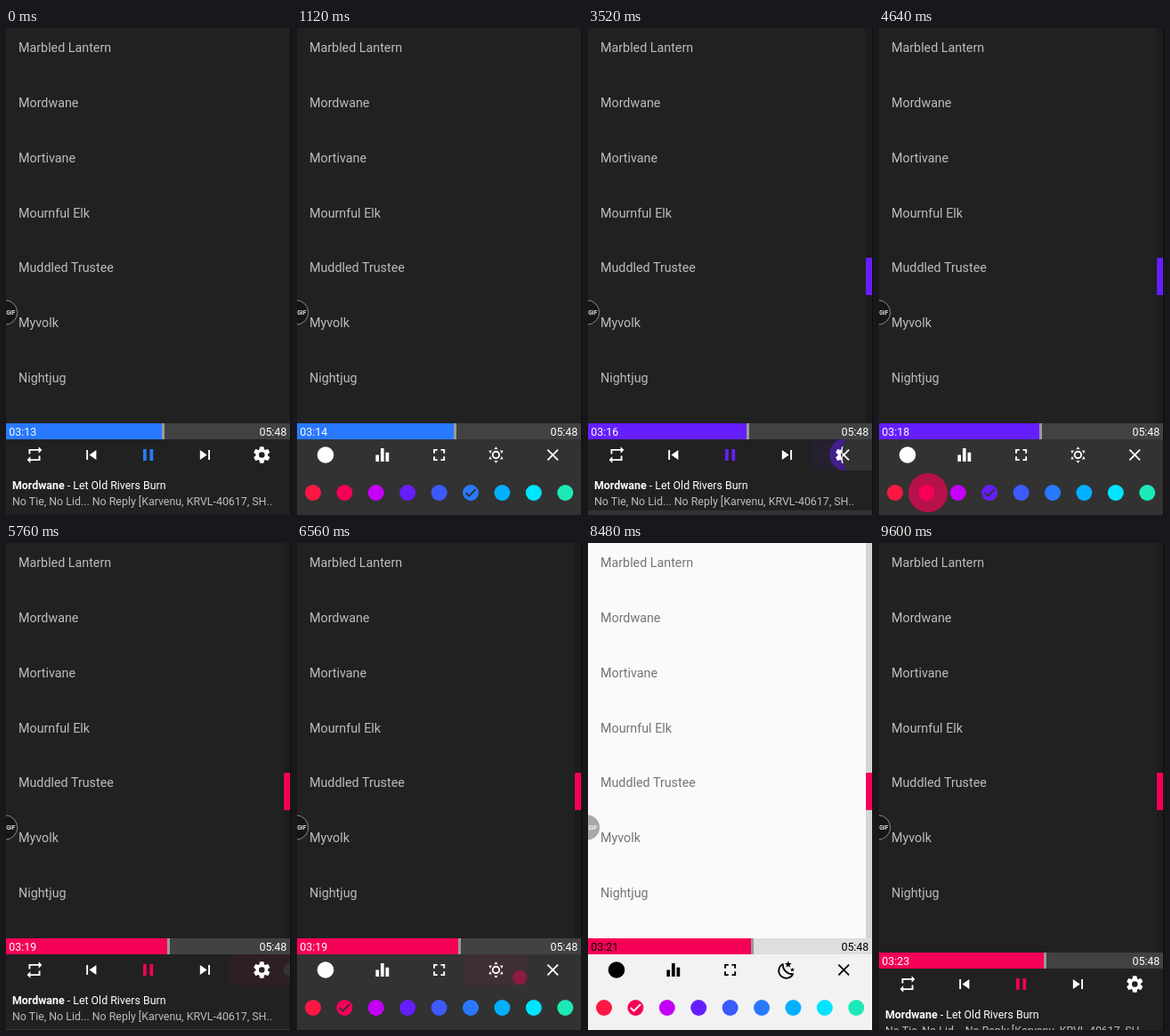
Recreate the animation shown at these times as an HTML page. Size 320x547 px, loop 9.76 s.

```html
<!DOCTYPE html>
<html lang="en">
<head>
<meta charset="utf-8">
<title>Music player themes</title>
<style>
  html, body { margin: 0; width: 100%; height: 100%; overflow: hidden; background: #212121; }
  svg { display: block; width: 100%; height: 100%; }
  text { font-family: Roboto, "Open Sans", sans-serif; font-size: 12.4px; white-space: pre; }
  .row { font-size: 14.3px; }
  .badge { font-size: 6.8px; font-weight: 500; }
</style>
</head>
<body>
<svg id="stage" viewBox="0 0 320 547" preserveAspectRatio="none"></svg>
<script>
const LOOP = 9760, STEP = 160, LENGTH = 348;
const stage = document.getElementById('stage');

const artists = ['Marbled Lantern', 'Mordwane', 'Mortivane', 'Mournful Elk',
  'Muddled Trustee', 'Myvolk', 'Nightjug'];
const swatches = ['#ff1744', '#f50057', '#c400f8', '#651fff', '#3d5afe',
  '#2979ff', '#00b0ff', '#00e5ff', '#1de9b6'];

const dark = { list: '#212121', panel: '#323232', bar: '#424242', row: '#bcbcbc',
  ink: '#fff', sub: '#bcbcbc', tick: '#303030', badge: '#161616', rim: '#8a8a8a' };
const light = { list: '#fafafa', panel: '#f2f2f2', bar: '#dedede', row: '#757575',
  ink: '#000', sub: '#666', tick: '#fff', badge: '#a8a8a8', rim: '#a8a8a8' };

// Each look lasts until the next one; its settings start to open at "open".
const looks = [
  { at: 0, pick: 5, theme: dark, open: 240 },
  { at: 2720, pick: 3, theme: dark, open: 3420, scroll: true },
  { at: 4960, pick: 1, theme: dark, open: 5715, scroll: true },
  { at: 7200, pick: 1, theme: light, open: 7960, scroll: true },
  { at: 9600, pick: 1, theme: dark, open: LOOP, scroll: true }
];

// Touch ripples: from and to are [x, y, radius].
const gear = [287, 479, 30], sun = [223, 479, 30];
const taps = [
  { at: 160, span: 480, from: [287, 479, 8], to: gear, button: true },
  { at: 2080, span: 640, from: [127, 522, 23], to: [124, 522, 25], color: swatches[3] },
  { at: 3520, span: 320, from: [289, 479, 18], to: gear, button: true },
  { at: 4640, span: 320, from: [55, 522, 22], to: [53, 522, 25], color: swatches[1] },
  { at: 5760, span: 320, from: [287, 479, 0], to: gear, button: true },
  { at: 6560, span: 640, from: [250, 488, 8], to: sun, button: true },
  { at: 8000, span: 320, from: [287, 479, 8], to: gear, button: true },
  { at: 8800, span: 640, from: [238, 486, 8], to: sun, button: true }
];

// Moments at which the elapsed seconds go up by one.
const ticks = [640, 1440, 2560, 3680, 4640, 5280, 6880, 8000, 8960, 9600];

const part = (t, a, b) => Math.min(1, Math.max(0, (t - a) / (b - a)));
const easeOut = k => 1 - (1 - k) ** 2;
const smooth = k => k * k * (3 - 2 * k);
const mix = (a, b, k) => a + (b - a) * k;
const clock = s => [s / 60, s % 60].map(n => String(Math.floor(n)).padStart(2, '0')).join(':');

const rect = (x, y, w, h, fill, more = '') =>
  `<rect x="${x}" y="${y}" width="${w}" height="${h}" fill="${fill}" ${more}/>`;
const disc = (x, y, r, fill, more = '') =>
  `<circle cx="${x}" cy="${y}" r="${r}" fill="${fill}" ${more}/>`;
const text = (x, y, fill, str, more = '') =>
  `<text x="${x}" y="${y}" fill="${fill}" ${more}>${str}</text>`;
const path = (d, more = '') => `<path d="${d}" ${more}/>`;
const clip = (id, shape, body) =>
  `<clipPath id="${id}">${shape}</clipPath><g clip-path="url(#${id})">${body}</g>`;
const shift = (y, body) => `<g transform="translate(0 ${y})">${body}</g>`;
const spin = (n, d) => Array.from({ length: n }, (_, i) =>
  path(d, `transform="rotate(${i * 360 / n} 12 12)"`)).join('');
const ring = (r, w) => disc(12, 12, r, 'none', `stroke="currentColor" stroke-width="${w}"`);

const icons = {
  repeat: path('M7 7h10v3l4-4-4-4v3H5v6h2zM17 17H7v-3l-4 4 4 4v-3h12v-6h-2z'),
  prev: path('M6 6h2v12H6zM9.5 12l8.5 6V6z'),
  pause: path('M6 19h4V5H6zM14 5v14h4V5z'),
  next: path('M6 18l8.5-6L6 6zM16 6v12h2V6z'),
  gear: ring(5.4, 3.7) + spin(6, 'M8.8 7l.8-4.6q.1-.4.5-.4h3.8q.4 0 .5.4L15.2 7z'),
  mark: disc(12, 12, 10, 'currentColor'),
  bars: path('M10 20h4V4h-4zM4 20h4v-8H4zM16 9v11h4V9z'),
  full: path('M7 14H5v5h5v-2H7zM5 10h2V7h3V5H5zM17 17h-3v2h5v-5h-2zM14 5v2h3v3h2V5z'),
  sun: ring(4, 2) + spin(6, 'M12 2l2.4 3.4q-2.4-.8-4.8 0z'),
  moon: path('M7 5A9 9 0 1 0 19.2 17A11.5 11.5 0 0 1 7 5z',
    'fill="none" stroke="currentColor" stroke-width="2" stroke-linejoin="round"') +
    path('M13.5 1l1.1 3 3.1.1-2.5 1.9.9 3.1-2.6-1.8-2.6 1.8.9-3.1-2.5-1.9 3.1-.1z') +
    path('M18.5 9l.7 2h2l-1.6 1.2.6 2-1.7-1.2-1.7 1.2.6-2-1.6-1.2h2z'),
  close: path('M19 6.4L17.6 5 12 10.6 6.4 5 5 6.4 10.6 12 5 17.6 6.4 19 12 13.4 17.6 19 19 17.6 13.4 12z')
};

const icon = (name, i, color) =>
  `<g transform="translate(${32 + i * 63.8} 479.5) scale(.93) translate(-12 -12)"
    fill="${color}" color="${color}">${icons[name]}</g>`;

function ripple(t, accent) {
  return taps.filter(p => t >= p.at && t < p.at + p.span).map(p => {
    const k = part(t, p.at, p.at + p.span);
    const [x, y, r] = p.from.map((v, i) => mix(v, p.to[i], easeOut(k)));
    const color = p.color || accent;
    const fade = 1 - part(k, 0.5, 1);
    const spot = disc(x, y, r, color, `fill-opacity="${0.43 * fade}"`);
    if (!p.button) return spot;
    const area = rect(p.to[0] - 35, 462, 70, 35, color, `fill-opacity="${0.06 * fade}"`);
    return area + clip('tap', area, spot);
  }).join('');
}

function player(c, accent, glow) {
  return glow +
    ['repeat', 'prev', 'pause', 'next', 'gear'].map((n, i) =>
      icon(n, i, n === 'pause' ? accent : c.ink)).join('') +
    text(7, 518, c.ink, '<tspan font-weight="700">Mordwane</tspan> - Let Old Rivers Burn') +
    text(7, 536, c.sub, 'No Tie, No Lid... No Reply [Karvenu, KRVL-40617, SH..');
}

// The tool row opens as a circle from the right while the colours slide up.
function settings(c, pick, k, glow) {
  const tools = rect(0, 462, 320, 35, c.panel) + glow +
    ['mark', 'bars', 'full', c === light ? 'moon' : 'sun', 'close'].map((n, i) =>
      icon(n, i, c.ink)).join('');
  const dots = swatches.map((s, i) => {
    const x = 18 + i * 35.4;
    const tick = path(`M${x - 5.6} 522l3.7 3.7 7.5-7.5`,
      `fill="none" stroke="${c.tick}" stroke-width="1.9"`);
    return disc(x, 522, 9, s) + (i === pick ? tick : '');
  }).join('');
  return shift(50 * (1 - k), rect(0, 497, 320, 50, c.panel) + glow + dots) +
    clip('reveal', disc(319, 479, 325 * k, '#000'), tools);
}

function progress(c, accent, sec) {
  const x = Math.floor(sec / LENGTH * 319);
  return rect(0, 444, 320, 18, c.bar) + rect(0, 444, x, 18, accent) +
    rect(x - 1, 444, 3, 18, '#999') +
    text(3.3, 458, c.ink, clock(sec)) +
    text(315.3, 458, c.ink, clock(LENGTH), 'text-anchor="end"');
}

function draw(t) {
  const look = looks.filter(l => l.at <= t).pop();
  const { theme: c, pick, open } = look;
  const accent = swatches[pick];
  const sec = 193 + ticks.filter(at => at <= t).length;
  const drop = look.at ? 16 * (1 - part(t, look.at, look.at + 320)) ** 2 : 0;
  const reveal = smooth(part(t, open, open + 500));
  const glow = ripple(t, accent);

  let out = rect(0, 0, 320, 547, c.list);
  out += artists.map((a, i) => text(14, 27 + i * 61.85, c.row, a, 'class="row"')).join('');
  if (look.scroll)
    out += rect(312, 0, 7, 444 + drop, '#000', 'fill-opacity=".15"') + rect(312, 258, 7, 42, accent);

  let deck = progress(c, accent, sec);
  if (reveal < 1) deck += player(c, accent, glow);
  if (reveal > 0) deck += settings(c, pick, reveal, reveal < 1 ? '' : glow);

  stage.innerHTML = out + shift(drop, deck) +
    disc(-1, 319.5, 13.7, c.badge, `stroke="${c.rim}"`) +
    text(5.3, 322, '#fff', 'GIF', 'class="badge" text-anchor="middle"') +
    rect(319, 0, 1, 547, '#0c0c0c');
}

const start = performance.now();
let shown = -1;
function frame() {
  const t = Math.floor((performance.now() - start) % LOOP / STEP) * STEP;
  if (t !== shown) draw(shown = t);
  requestAnimationFrame(frame);
}
frame();
</script>
</body>
</html>
```
